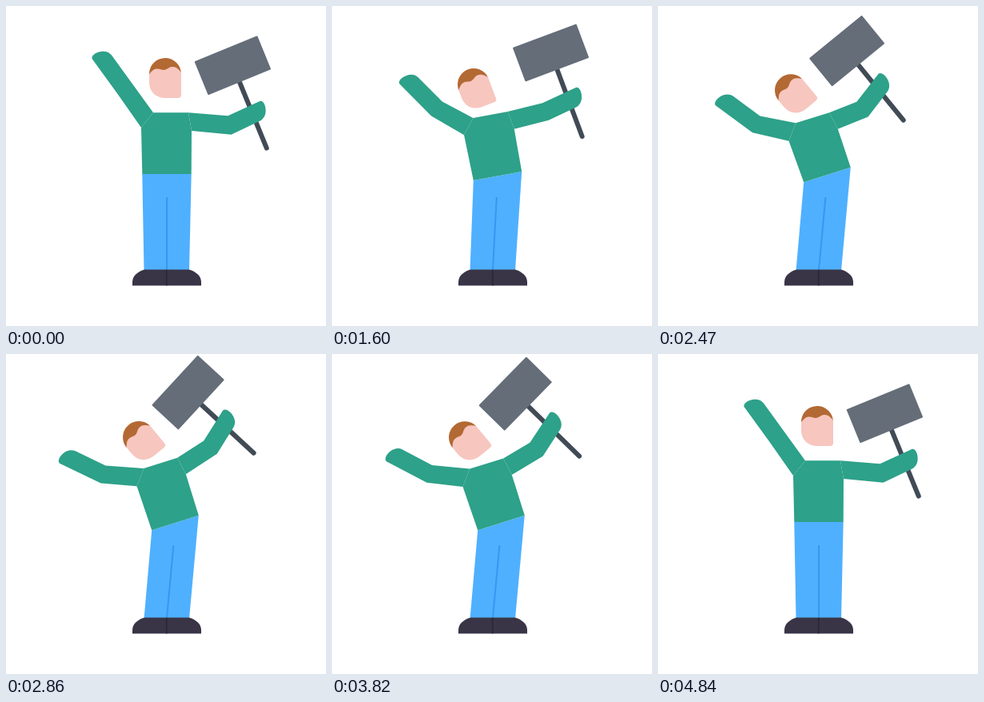
Recreate the animation shown at these times as an HTML page with a canvas. Size 400 by 400 pixels, loop 4900 ms.

```html
<!DOCTYPE html>
<html lang="en">
<head>
<meta charset="utf-8">
<title>Waving a sign</title>
<style>
html, body { margin: 0; width: 100%; height: 100%; overflow: hidden; background: #fff; }
canvas { display: block; width: 400px; height: 400px; }
</style>
</head>
<body>
<canvas id="stage" width="400" height="400"></canvas>
<script>
const ctx = document.getElementById('stage').getContext('2d');
const LOOP = 4900, STEP = 30, START = 1000, WIND = 1270, MIDDLE = 2890;

// hip x, y, lean | head x, y, turn | left elbow x, y, forearm turn |
// right elbow x, y, forearm turn | sign turn, grip height | shoulder drop
const rest  = [201, 210, 0,       199, 85, 0,       149, 104, -126,     279.5, 149, -25,     -22.3, 43.5, 0];
const wind  = [195.5, 211, 5.8,   212, 84, 17,      152.5, 96, -107,    280, 154, 5,         4.5, 42, 0];
const rise  = [199.5, 211, 0,     202, 89, 3.6,     145, 109, -118.7,   274.5, 145.5, -7.8,  -4, 41.5, 0];
const swing = [207, 212.5, -10.4, 177, 98, -20.8,   131, 128.5, -134.8, 267, 132, -25,       -20.5, 41.5, 0];
const up    = [211.5, 211, -17.5, 166, 104, -39.7,  121.5, 150.5, -154.5, 255.5, 116.5, -58, -47.4, 38.5, 0];
const down  = [211.5, 211, -17.5, 166, 105.5, -39.7, 123, 147.5, -142,  255.5, 131, -51.5,   -38, 39, 4];

const keys = [
  [START, rest], [WIND, wind], [1450, rise], [1600, swing],
  [1810, up], [2350, down], [MIDDLE, up]
];
const passing = new Set([rise, swing]);

const rad = deg => deg * Math.PI / 180;
const dir = deg => [Math.cos(rad(deg)), Math.sin(rad(deg))];
const mid = (a, b) => [(a[0] + b[0]) / 2, (a[1] + b[1]) / 2];

function slope(i, n) {
  if (!passing.has(keys[i][1])) return 0;
  const [t0, a] = keys[i - 1], [t1, b] = keys[i + 1];
  return (b[n] - a[n]) / (t1 - t0);
}

// The second half retraces the first, with a slower return to rest.
function poseAt(t) {
  if (t > MIDDLE) {
    t = 2 * MIDDLE - t;
    if (t < WIND) t = WIND - (WIND - t) * 270 / 330;
  }
  if (t <= START) return rest;
  let i = 0;
  while (i < keys.length - 2 && t >= keys[i + 1][0]) i++;
  const [t0, a] = keys[i], [t1, b] = keys[i + 1];
  const d = t1 - t0, s = (t - t0) / d, s2 = s * s, s3 = s2 * s;
  return a.map((v, n) =>
    v * (2 * s3 - 3 * s2 + 1) + b[n] * (3 * s2 - 2 * s3) +
    slope(i, n) * d * (s3 - 2 * s2 + s) + slope(i + 1, n) * d * (s3 - s2));
}

function poly(points, fill) {
  ctx.beginPath();
  points.forEach(p => ctx.lineTo(p[0], p[1]));
  ctx.closePath();
  ctx.fillStyle = fill;
  ctx.fill();
}

function line(x0, y0, x1, y1, width, color, cap = 'butt') {
  ctx.beginPath();
  ctx.moveTo(x0, y0);
  ctx.lineTo(x1, y1);
  ctx.lineWidth = width;
  ctx.lineCap = cap;
  ctx.strokeStyle = color;
  ctx.stroke();
}

// a and b are the shoulder ends of the limb's two edges; a lies on the -90° side.
function arm(a, b, elbow, turn, length, half) {
  const s = mid(a, b);
  const upper = Math.atan2(elbow[1] - s[1], elbow[0] - s[0]);
  const fore = rad(turn);
  const bend = Math.atan2(Math.sin(fore - upper), Math.cos(fore - upper)) / 2;
  const w = half / Math.cos(bend), n = upper + bend + Math.PI / 2;
  const nx = Math.cos(n) * w, ny = Math.sin(n) * w;
  const [ux, uy] = dir(turn);
  const at = (x, y) => [elbow[0] + ux * x - uy * y, elbow[1] + uy * x + ux * y];
  ctx.beginPath();
  ctx.moveTo(...a);
  ctx.lineTo(elbow[0] - nx, elbow[1] - ny);
  ctx.lineTo(...at(length, -11.2));
  ctx.bezierCurveTo(...at(length + 4, -10), ...at(length + 4, -3), ...at(length + 1, 3));
  ctx.bezierCurveTo(...at(length - 1, 7), ...at(length - 5, 11.2), ...at(length - 11, 11.2));
  ctx.lineTo(elbow[0] + nx, elbow[1] + ny);
  ctx.lineTo(...b);
  ctx.closePath();
  ctx.fillStyle = '#2da189';
  ctx.fill();
}

function sign(elbow, turn, tilt, grip) {
  const [ux, uy] = dir(turn);
  ctx.save();
  ctx.translate(elbow[0] + ux * 32, elbow[1] + uy * 32);
  ctx.rotate(rad(tilt));
  line(0, -grip - 2, 0, 89 - grip, 6, '#414b56', 'round');
  ctx.fillStyle = '#646d78';
  ctx.beginPath();
  ctx.roundRect(-42.5, -grip - 45.3, 85, 45.3, 1);
  ctx.fill();
  ctx.restore();
}

function head(x, y, turn) {
  ctx.save();
  ctx.translate(x, y);
  ctx.rotate(rad(turn));
  ctx.fillStyle = '#f7c6bf';
  ctx.beginPath();
  ctx.moveTo(-20, -2);
  ctx.lineTo(-20, 10);
  ctx.bezierCurveTo(-20, 22, -12, 30, 0, 30);
  ctx.lineTo(16, 30);
  ctx.quadraticCurveTo(20, 30, 20, 26);
  ctx.lineTo(20, -2);
  ctx.bezierCurveTo(14, -14, -14, -14, -20, -2);
  ctx.fill();
  ctx.fillStyle = '#b36933';
  ctx.beginPath();
  ctx.moveTo(-20, 0);
  ctx.arc(0, 0, 20, Math.PI, -0.1);
  ctx.bezierCurveTo(17, -6, 13, -9.5, 8.5, -9);
  ctx.bezierCurveTo(4, -8.5, 2, -5, -2, -5);
  ctx.bezierCurveTo(-5, -5, -7, -7, -11, -6.5);
  ctx.bezierCurveTo(-15, -6, -17, -3, -20, 0);
  ctx.fill();
  ctx.restore();
}

function shoe(side) {
  ctx.save();
  ctx.translate(201, 0);
  ctx.scale(side, 1);
  ctx.fillStyle = '#393446';
  ctx.beginPath();
  ctx.moveTo(0, 329.5);
  ctx.lineTo(28, 329.5);
  ctx.bezierCurveTo(36, 332, 43, 337, 43, 345);
  ctx.lineTo(43, 349.5);
  ctx.lineTo(0, 349.5);
  ctx.fill();
  ctx.restore();
}

function draw(time) {
  const [hx, hy, lean, headX, headY, headTurn, lx, ly, lTurn,
    rx, ry, rTurn, tilt, grip, drop] = poseAt(time);
  const [c, s] = dir(lean);
  const body = (x, y) => [hx + x * c - y * s, hy + x * s + y * c];
  const lower = p => [p[0], p[1] + drop];

  ctx.fillStyle = '#fff';
  ctx.fillRect(0, 0, 400, 400);

  const hemL = body(-30.7, 0), hemR = body(30.7, 0);
  poly([hemL, hemR, [229, 331], [172.5, 331]], '#4fb0ff');
  line(201 + (hx - 201) * 0.8, 239, 201, 330, 2, '#3796f2');
  shoe(-1);
  shoe(1);
  line(200.7, 330, 200.7, 349.5, 1.6, '#2a2633');

  sign([rx, ry], rTurn, tilt, grip);

  const neckL = lower(body(-17, -76.8)), pitL = lower(body(-32, -58));
  const neckR = lower(body(27, -76.8)), pitR = lower(body(31, -54));
  poly([neckL, neckR, pitR, hemR, hemL, pitL], '#2da189');
  arm(pitL, neckL, [lx, ly], lTurn, 55, 11.2);
  arm(neckR, pitR, [rx, ry], rTurn, 47.4, 11.4);
  head(headX, headY, headTurn);
}

const begin = performance.now();
function tick() {
  const t = (performance.now() - begin) % LOOP;
  draw(START + Math.floor((t - START) / STEP) * STEP);
  requestAnimationFrame(tick);
}
tick();
</script>
</body>
</html>
```
